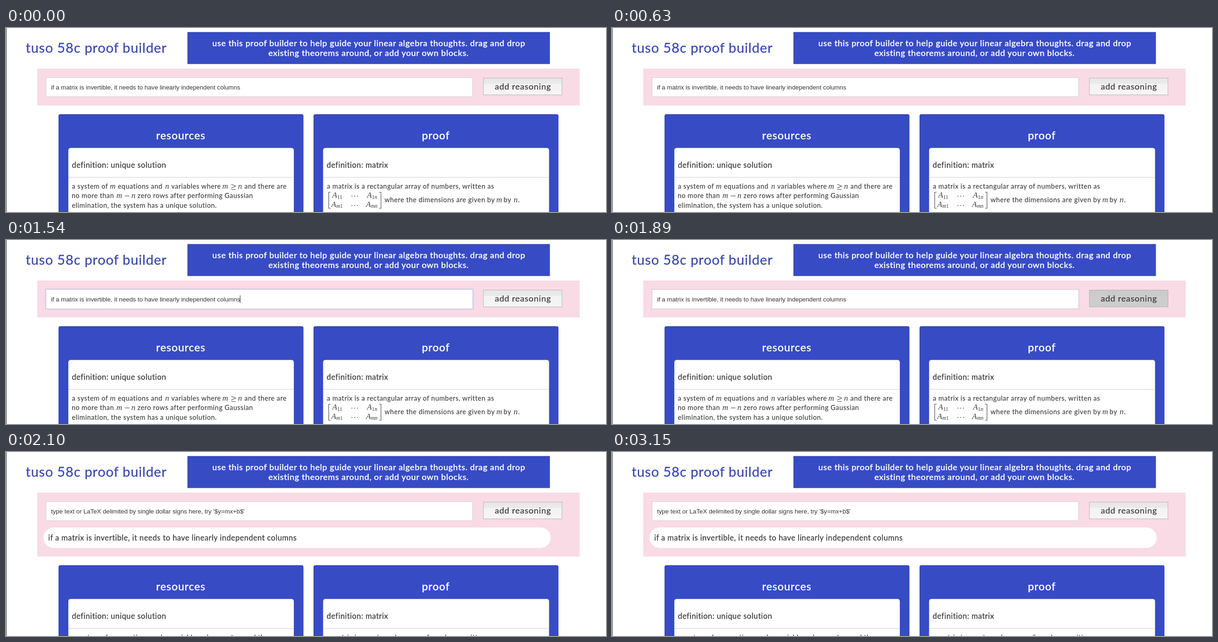
These frames come from a looping animation (1280 px wide and 395 px high, 3220 ms). An HTML page:

```html
<!DOCTYPE html>
<html lang="en">
<head>
<meta charset="utf-8">
<title>proof builder</title>
<style>
  html, body { margin: 0; width: 100%; height: 100%; overflow: hidden; background: #fff; }
  svg { display: block; width: 100%; height: 100%; }
  text { font-family: Lato, sans-serif; letter-spacing: .03em; fill: #3a3a3a; white-space: pre; }
  .title { font-size: 29px; fill: #3a49ae; stroke: #3a49ae; stroke-width: .3; }
  .banner { font-size: 18px; font-weight: 500; letter-spacing: .034em; fill: #fff; stroke: #fff; stroke-width: .35; }
  .heading { font-size: 23px; font-weight: 500; letter-spacing: .04em; fill: #fff; stroke: #fff; stroke-width: .3; }
  .item { font-size: 16.4px; stroke: #3a3a3a; stroke-width: .25; }
  .body { font-size: 14.4px; font-weight: 500; letter-spacing: .034em; }
  .button { font-size: 18.1px; letter-spacing: .04em; stroke: #3a3a3a; stroke-width: .25; }
  .field { font: 13.25px "Liberation Sans", Arial, sans-serif; letter-spacing: 0; fill: #333; }
  .math { font: italic 17px "Liberation Serif", serif; letter-spacing: 0; }
  .sub { font-size: 11.5px; }
  .upright { font-style: normal; }
  .mid { text-anchor: middle; }
  .blue { fill: #374bc5; stroke: #2b3a97; }
  .rule { stroke: #cfcfcf; }
  .bracket { fill: none; stroke: #444; stroke-width: 1.1; }
</style>
</head>
<body>
<svg viewBox="0 0 1280 395">
  <defs>
    <linearGradient id="sheen" x2="0" y2="1">
      <stop offset="0" stop-color="#e7e7e7"/>
      <stop offset=".36" stop-color="#ebebeb"/>
      <stop offset=".36" stop-color="#f3f3f3"/>
      <stop offset="1" stop-color="#f5f5f5"/>
    </linearGradient>
  </defs>
  <rect width="1280" height="395" fill="#fff"/>
  <rect width="1" height="395" fill="#222"/>

  <text class="title" x="42" y="53.2">tuso 58c proof builder</text>
  <rect class="blue" x="387.7" y="9.2" width="772.1" height="67.6"/>
  <text class="banner mid" x="774" y="39.2">use this proof builder to help guide your linear algebra thoughts. drag and drop</text>
  <text class="banner mid" x="773.5" y="59.8">existing theorems around, or add your own blocks.</text>

  <rect id="form" x="66.5" y="87" width="1157.5" height="79.5" fill="#f9dbe5"/>
  <rect x="85.5" y="106.5" width="910" height="41" fill="#fff" stroke="#d0cdd0"/>
  <rect id="ring" x="84.5" y="105.5" width="912" height="43" rx="1.5" fill="none" stroke="#d8d0e6" stroke-width="3"/>
  <text id="field" class="field" x="96" y="132"></text>
  <rect id="caret" x="499" y="119" width="1" height="16" fill="#222"/>

  <rect x="1018.5" y="107.5" width="167.5" height="36" fill="url(#sheen)" stroke="#b8b5b8"/>
  <rect id="press" x="1018.5" y="107.5" width="167.5" height="36" fill="#c1c1c1" stroke="#b0b0b0"/>
  <text class="button mid" x="1102.8" y="131.7">add reasoning</text>

  <g id="added">
    <rect x="80" y="162" width="1082" height="44" rx="22" fill="#fff"/>
    <text class="item" x="90" y="190">if a matrix is invertible, it needs to have linearly independent columns</text>
  </g>

  <g id="panels"></g>
</svg>
<script>
const LOOP = 3220, STEP = 70, FOCUS = 1260, PRESS = 1750, ADDED = 2100, GROWTH = 58;
const REASON = "if a matrix is invertible, it needs to have linearly independent columns";
const HINT = "type text or LaTeX delimited by single dollar signs here, try '$y=mx+b$'";
const el = id => document.getElementById(id);

const text = (cls, x, y, s) => `<text class="${cls}" x="${x}" y="${y}">${s}</text>`;
const math = (x, y, s) => text("math", x, y, s);
const body = (x, y, s) => text("body", x, y, s);
const index = s => `<tspan class="${s === "1" ? "upright" : ""}">${s}</tspan>`;
const entry = (x, y, row, col) => math(x, y,
  `A<tspan class="sub" dy="2.5">${index(row)}${index(col)}</tspan>`);
const dots = y => [738, 744, 750].map(x => `<circle cx="${x}" cy="${y}" r=".95" fill="#444"/>`).join("");

const panel = (x, cardX, cardWidth, heading, definition) => `
  <rect class="blue" x="${x + .7}" y="185.7" width="521.3" height="260" rx="2.5"/>
  ${text("heading mid", x + 261, 239, heading)}
  <rect x="${cardX}" y="257.4" width="${cardWidth}" height="180" rx="5" fill="#fff"/>
  ${text("item", cardX + 7.5, 300, "definition: " + definition)}
  <path class="rule" d="M${cardX} 320.5h${cardWidth}"/>`;

el("panels").innerHTML =
  panel(112, 133, 481, "resources", "unique solution") +
  body(140.5, 345, "a system of") + math(221.5, 345, "m") +
  body(238.5, 345, "equations and") + math(339.5, 345, "n") +
  body(352.5, 345, "variables where") + math(461.5, 345, "m") +
  `<path class="bracket" d="M480.5 335.5l9.5 4-9.5 4M480.5 346.5h9.5"/>` +
  math(495, 345, "n") + body(508.5, 345, "and there are") +
  body(140, 365, "no more than") + math(235.5, 365, "m") +
  `<path class="bracket" d="M253.5 360.5h10"/>` +
  math(267.5, 365, "n") + body(280.5, 365, "zero rows after performing Gaussian") +
  body(140.5, 386, "elimination, the system has a unique solution.") +
  panel(656, 676.5, 482, "proof", "matrix") +
  body(684.5, 345, "a matrix is a rectangular array of numbers, written as") +
  `<path class="bracket" d="M692.5 352.5h-4v34.5h4M796 352.5h4v34.5h-4"/>` +
  entry(696, 364, "1", "1") + dots(361) + entry(770, 364, "1", "n") +
  entry(694, 383.5, "m", "1") + dots(381) + entry(768, 383.5, "m", "n") +
  body(807.5, 374, "where the dimensions are given by") + math(1046, 374, "m") +
  body(1061.5, 374, "by") + math(1083, 374, "n") + body(1092.5, 374, ".");

const clamp = v => Math.max(0, Math.min(1, v));
const show = (id, amount) => el(id).setAttribute("opacity", amount);

function draw(time) {
  const t = Math.floor((time % LOOP) / STEP) * STEP;
  const added = t >= ADDED;
  const focused = clamp((t - FOCUS + STEP) / (3 * STEP));
  const pressed = clamp((t - PRESS + STEP) / (4 * STEP));
  show("ring", added ? 0 : focused * (1 - pressed));
  show("caret", t >= FOCUS && t < PRESS ? 1 : 0);
  show("press", added ? 0 : pressed);
  show("added", added ? 1 : 0);
  el("field").textContent = added ? HINT : REASON;
  el("form").setAttribute("height", 79.5 + (added ? GROWTH : 0));
  el("panels").setAttribute("transform", `translate(0 ${added ? GROWTH : 0})`);
}

const start = performance.now();
function tick() {
  draw(performance.now() - start);
  requestAnimationFrame(tick);
}
tick();
</script>
</body>
</html>
```
